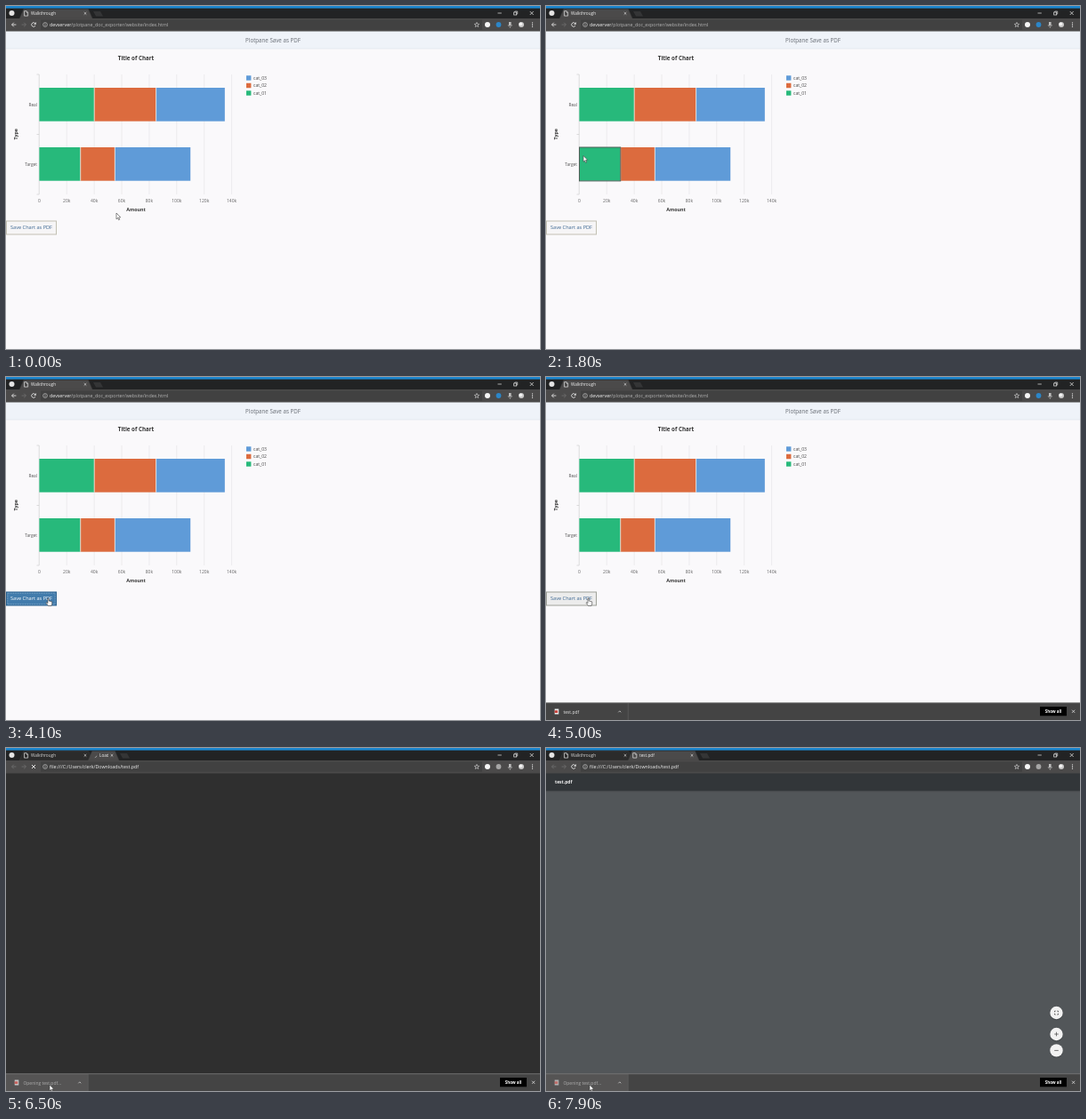
An HTML page with a canvas that plays this animation: 600 by 386 pixels, repeating every 8000 ms.

```html
<!DOCTYPE html>
<html lang="en">
<head>
<meta charset="utf-8">
<title>Save chart</title>
<style>
html, body { margin: 0; width: 100%; height: 100%; overflow: hidden; background: #faf9fb; }
canvas { display: block; width: 600px; height: 386px; }
</style>
</head>
<body>
<canvas id="stage"></canvas>
<script>
const LOOP = 8000, STEP = 100;
const FONT = '"Open Sans", "Noto Sans", sans-serif';
const GREEN = '#27b97b', ORANGE = '#dc6b3e', BLUE = '#5f9bd8';
const stage = document.getElementById('stage');
const c = stage.getContext('2d');
const scale = window.devicePixelRatio || 1;
stage.width = 600 * scale;
stage.height = 386 * scale;

// Pointer stops: time, x, y
const route = [[0, 124, 233], [700, 124, 233], [1600, 42, 168.5], [2000, 42, 168.5],
  [2800, 47, 249], [5500, 47, 249], [6200, 49, 379], [LOOP, 49, 379]];

const clamp = v => Math.max(0, Math.min(1, v));
const ease = v => v * v * (3 - 2 * v);

function pointerAt(t) {
  const i = Math.max(1, route.findIndex(p => p[0] > t));
  const [a, b] = [route[i - 1], route[i]];
  const k = ease((t - a[0]) / (b[0] - a[0]));
  return [a[1] + (b[1] - a[1]) * k, a[2] + (b[2] - a[2]) * k];
}

function rect(x, y, w, h, fill) {
  c.fillStyle = fill;
  c.fillRect(x, y, w, h);
}

function frame(x, y, w, h, color, width = 0.8) {
  c.strokeStyle = color;
  c.lineWidth = width;
  c.strokeRect(x, y, w, h);
}

function path(points, { fill, stroke, width = 0.8, close } = {}) {
  c.beginPath();
  points.forEach(([x, y]) => c.lineTo(x, y));
  if (close || fill) c.closePath();
  if (fill) { c.fillStyle = fill; c.fill(); }
  if (stroke) { c.strokeStyle = stroke; c.lineWidth = width; c.stroke(); }
}

const line = (x1, y1, x2, y2, stroke, width) => path([[x1, y1], [x2, y2]], { stroke, width });

function disc(x, y, r, fill) {
  c.fillStyle = fill;
  c.beginPath();
  c.arc(x, y, r, 0, 7);
  c.fill();
}

function arc(x, y, r, from, to, color, width = 0.9) {
  c.strokeStyle = color;
  c.lineWidth = width;
  c.beginPath();
  c.arc(x, y, r, from, to);
  c.stroke();
}

function text(str, x, y, size, color, align = 'left', weight = 400) {
  c.font = `${weight} ${size}px ${FONT}`;
  c.fillStyle = color;
  c.textAlign = align;
  c.fillText(str, x, y + size * 0.35);
}

function cross(x, y, r, color, width = 0.8) {
  line(x - r, y - r, x + r, y + r, color, width);
  line(x - r, y + r, x + r, y - r, color, width);
}

function clipTo(x, y, w, h, draw) {
  c.save();
  c.beginPath();
  c.rect(x, y, w, h);
  c.clip();
  draw();
  c.restore();
}

function sheet(x, y, color) {
  path([[x - 2, y - 2.7], [x + 0.7, y - 2.7], [x + 2.1, y - 1.2], [x + 2.1, y + 2.7], [x - 2, y + 2.7]],
    { stroke: color, width: 0.7, close: true });
  path([[x + 0.5, y - 2.6], [x + 0.5, y - 1], [x + 2, y - 1]], { stroke: color, width: 0.5 });
}

function tab(x1, x2, active, title, icon) {
  path([[x1, 14], [x1 + 4.5, 3.5], [x2 - 4.5, 3.5], [x2, 14]],
    { fill: active ? '#4b4a4a' : '#2b2b2b', stroke: '#3f3f3f', width: 0.5 });
  icon();
  clipTo(x1 + 11, 3, x2 - x1 - 23, 11, () => text(title, x1 + 12.7, 8.3, 4.7, active ? '#f2f2f2' : '#d8d8d8'));
  cross(x2 - 8, 8.3, 1.3, '#ddd', 0.7);
}

function tabs(t) {
  rect(0, 0, 600, 14, '#222324');
  rect(0, 0, 600, 2.6, '#1c86cf');
  disc(6.5, 8, 3, '#e4e4e4');
  const opened = t >= 6500;
  let end = 97;
  tab(15.3, 97, !opened, 'Walkthrough', () => sheet(22.5, 8.4, '#e4e4e4'));
  if (opened) {
    end = t < 6600 ? 127 : t < 6700 ? 160 : 172;
    const ready = t >= 6700;
    tab(92.3, end, true, ready ? 'test.pdf' : 'Loading...', () => {
      if (ready) sheet(99.7, 8.4, '#e4e4e4');
      else arc(99.5, 8.4, 2.4, 3.5 + t / 160, 4.8 + t / 160, '#b0b0b0', 0.7);
    });
  }
  path([[end + 1, 6], [end + 9, 6], [end + 12, 11.5], [end + 4, 11.5]], { fill: '#343536' });
  line(552.5, 8, 556.8, 8, '#e8e8e8', 0.7);
  frame(570.7, 7, 3, 3, '#e8e8e8', 0.7);
  path([[571.7, 7], [571.7, 6], [574.7, 6], [574.7, 9], [573.7, 9]], { stroke: '#e8e8e8', width: 0.6 });
  cross(590.7, 8, 2, '#f2f2f2', 0.7);
}

function arrow(x, dir, color) {
  line(x - 2.4, 21, x + 2.4, 21, color, 0.9);
  path([[x + dir * 0.2, 18.7], [x + dir * 2.5, 21], [x + dir * 0.2, 23.3]], { stroke: color, width: 0.9 });
}

function toolbar(t) {
  const opened = t >= 6500;
  rect(0, 14, 600, 14.5, '#4b4a4a');
  rect(39, 15.5, 496, 11.2, '#414141');
  arrow(9, -1, opened ? '#6c6c6c' : '#e0e0e0');
  arrow(20, 1, '#6c6c6c');
  if (opened && t < 6700) cross(31, 21, 2, '#e8e8e8', 1);
  else {
    arc(31, 21, 2.3, 0.5, 5.6, '#e0e0e0');
    path([[33.8, 18], [33.8, 20.7], [31.2, 20.7]], { fill: '#e0e0e0' });
  }
  arc(44, 21, 2.4, 0, 7, '#cfcfcf', 0.6);
  rect(43.7, 20.5, 0.6, 1.9, '#cfcfcf');
  rect(43.7, 19.4, 0.6, 0.6, '#cfcfcf');
  if (opened) text('file:///C:/Users/clerk/Downloads/test.pdf', 49, 21, 5.33, '#ededed');
  else {
    text('devserver', 49, 21, 5.33, '#f4f4f4');
    const w = c.measureText('devserver').width;
    text('/plotpane_doc_exporter/website/index.html', 49 + w, 21, 5.33, '#b4b4b4');
  }
  const star = Array.from({ length: 10 }, (_, i) => {
    const a = i * Math.PI / 5, r = i % 2 ? 1.2 : 2.8;
    return [529 + r * Math.sin(a), 21.2 - r * Math.cos(a)];
  });
  path(star, { stroke: '#dcdcdc', width: 0.6, close: true });
  disc(541, 21, 3, '#f5f5f5');
  disc(553.5, 21, 2.9, opened ? '#a5a5a5' : '#2c86c8');
  rect(565, 18, 2.6, 4, '#bdbdbd');
  arc(566.3, 21, 2.2, 0, Math.PI, '#a8a8a8', 0.7);
  rect(565.9, 23, 0.8, 1.7, '#a8a8a8');
  disc(579, 21, 3, '#c9c9c9');
  disc(578.3, 20.2, 1.8, '#f4f4f4');
  for (const y of [18.8, 21, 23.2]) disc(591.5, y, 0.65, '#e6e6e6');
}

function chart(hover) {
  const px = k => 37.4 + k * 1.544;
  text('Title of Chart', 146, 59, 6.2, '#333', 'center', 700);
  for (let k = 0; k <= 140; k += 20) {
    if (k) line(px(k), 77, px(k), 212, '#e7e6e8', 0.7);
    text(k ? k + 'k' : '0', px(k), 219, 5, '#666', 'center');
  }
  line(37.2, 77, 37.2, 212, '#cfcfcf', 0.7);
  for (const y of [77, 144.5, 212]) line(34.5, y, 37.2, y, '#cfcfcf', 0.7);
  text('Amount', 146, 228.8, 5.3, '#333', 'center', 700);
  c.save();
  c.translate(11.5, 144.3);
  c.rotate(-Math.PI / 2);
  text('Type', 0, 0, 5.3, '#333', 'center', 700);
  c.restore();

  const rows = [['Real', 92, [40, 85, 135]], ['Target', 159, [30, 55, 110]]];
  for (const [name, y, ends] of rows) {
    text(name, 35, y + 19, 4.8, '#555', 'right');
    ends.forEach((end, i) => {
      const x = px(i ? ends[i - 1] : 0);
      rect(x, y, px(end) - x, 37.7, [GREEN, ORANGE, BLUE][i]);
      if (i) line(x, y, x, y + 37.7, '#f3ece6', 0.8);
    });
  }
  if (hover) frame(37.5, 159, px(30) - 37.5, 37.9, '#4c5f57', 1);

  [[BLUE, 'cat_03'], [ORANGE, 'cat_02'], [GREEN, 'cat_01']].forEach(([color, name], i) => {
    const y = 81 + i * 8.5;
    rect(270, y - 2.7, 5.4, 5.4, color);
    text(name, 278, y, 5, '#444');
  });
}

function button(t, hover) {
  const pressed = t >= 3900 && t < 4300;
  const focused = t >= 4300;
  rect(0.5, 242, 56, 15, pressed ? '#427cac' : hover ? '#ececec' : '#f6f5f6');
  frame(0.5, 242, 56, 15, pressed ? '#2d638f' : focused ? '#9fa199' : '#c3c0b3', 1);
  if (pressed) {
    c.setLineDash([0.8, 0.8]);
    frame(1.8, 243.3, 53.4, 12.4, '#bcd2e4', 0.5);
    c.setLineDash([]);
  }
  text('Save Chart as PDF', 28.5, 249.4, 5.6, pressed ? '#fff' : '#3a6591', 'center');
}

function page(t, x, y) {
  const onButton = x < 57 && y > 242 && y < 257;
  const onBar = x > 37 && x < 83 && y > 159 && y < 197;
  rect(0, 28, 600, 358, '#faf9fb');
  rect(0, 28, 600, 20, '#eff3f9');
  line(0, 48, 600, 48, '#dfe4ec', 0.7);
  text('Plotpane Save as PDF', 300, 38.4, 6.2, '#666b73', 'center');
  chart(onBar);
  button(t, onButton);
}

function viewer(t) {
  rect(0, 28, 600, 358, t < 6700 ? '#2f2f2f' : '#525659');
  const k = ease(clamp((t - 7200) / 300));
  if (!k) return;
  const top = 28 - 20 * (1 - k);
  clipTo(0, 28, 600, 30, () => {
    rect(0, top + 20, 600, 1.2, '#45484b');
    rect(0, top, 600, 20, '#323639');
    text('test.pdf', 10, top + 10.4, 5, '#f4f4f4', 'left', 700);
  });
  const x = 573.5 + 30 * (1 - k);
  for (const y of [298, 322, 340.4]) {
    disc(x, y + 0.7, 7.5, '#43474a');
    disc(x, y, 7.2, '#f2f2f2');
  }
  for (const sx of [-1, 1]) for (const sy of [-1, 1]) {
    path([[x + sx * 2, 298 + sy * 0.8], [x + sx * 2, 298 + sy * 2], [x + sx * 0.8, 298 + sy * 2]],
      { stroke: '#444', width: 0.8 });
  }
  line(x - 2.3, 322, x + 2.3, 322, '#555', 0.8);
  line(x, 319.7, x, 324.3, '#555', 0.8);
  line(x - 2.3, 340.4, x + 2.3, 340.4, '#555', 0.8);
}

function shelf(t, hover) {
  const k = ease(clamp((t - 4300) / 300));
  if (!k) return;
  const opening = t >= 6500;
  c.save();
  c.translate(0, 19.5 * (1 - k));
  rect(0, 366.5, 600, 20, '#444');
  if (hover) rect(0, 367, 92, 19, '#555454');
  line(0, 366.7, 600, 366.7, '#858585', 0.7);
  line(92.3, 367, 92.3, 386, '#666', 0.6);
  c.globalAlpha = opening ? 0.65 + 0.2 * Math.cos(t / 200) : 1;
  rect(9.7, 373.5, 4.6, 6, '#eee');
  rect(9.7, 375.2, 3.5, 2.8, '#c8433c');
  c.globalAlpha = 1;
  text(opening ? 'Opening test.pdf...' : 'test.pdf', 19.5, 377.6, 4.95, opening ? '#adadad' : '#e6e6e6');
  path([[81.3, 377.3], [82.8, 375.8], [84.3, 377.3]], { stroke: '#ccc', width: 0.8 });
  rect(555, 371, 30, 10.3, '#000');
  text('Show all', 570, 376.2, 4.5, '#fff', 'center', 700);
  cross(592.6, 376.3, 1.6, '#ddd');
  c.restore();
}

function pointer(x, y, hand) {
  const shape = hand
    ? [[0, 0], [1, 0], [1.2, 3], [4.6, 3.8], [4.8, 6], [4, 8.5], [0.5, 8.5], [-2, 5.2], [-1.3, 4.6], [0, 5.5]]
    : [[0, 0], [0, 6.8], [1.5, 5.4], [2.6, 7.8], [3.7, 7.3], [2.6, 5], [4.7, 4.8]];
  path(shape.map(([dx, dy]) => [x + dx, y + dy]), { fill: '#fff', stroke: '#3c3c3c', width: 0.6 });
}

function draw(now) {
  const t = Math.floor(now % LOOP / STEP) * STEP;
  const [x, y] = pointerAt(t);
  c.setTransform(scale, 0, 0, scale, 0, 0);
  if (t < 6500) page(t, x, y);
  else viewer(t);
  tabs(t);
  toolbar(t);
  shelf(t, y > 367);
  pointer(x, y, t < 6500 && x < 57 && y > 242 && y < 257);
}

const start = performance.now();
function tick() {
  draw(performance.now() - start);
  requestAnimationFrame(tick);
}
tick();
</script>
</body>
</html>
```
